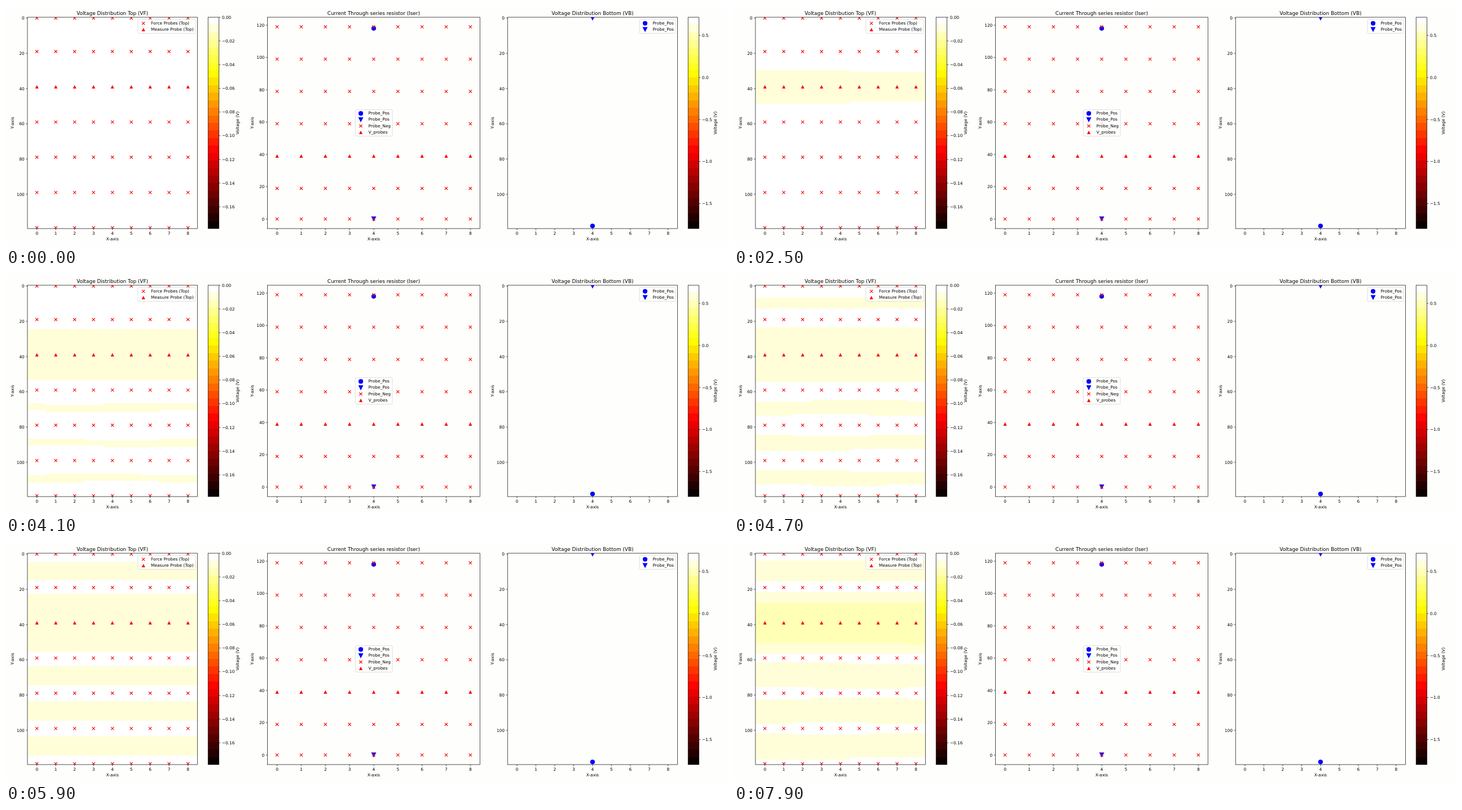
An HTML page with a canvas that plays this animation: 1280 by 427 pixels, repeating every 8000 ms.

```html
<!DOCTYPE html>
<html lang="en">
<head>
<meta charset="utf-8">
<title>Probe voltage distribution</title>
<style>
html, body { margin: 0; width: 100%; height: 100%; overflow: hidden; background: #fefefd; }
canvas { display: block; }
</style>
</head>
<body>
<canvas id="stage" width="1280" height="427"></canvas>
<script>
const ctx = document.getElementById('stage').getContext('2d');
const LOOP = 8000, FIRST_HOLD = 500, STEP = 200;
const TOP = 20, BOTTOM = 396, ROW = (BOTTOM - TOP) / 120;
const RED = '#ff0000', BLUE = '#0000ff';
const GROUND_ROWS = [0, 19, 59, 79, 99, 119];

const imageRow = v => TOP + (v + 0.5) * ROW;
const plotRow = v => 379 - v * 2.874;
const topPlot = { x: 38, w: 301.3, y: imageRow };
const currentPlot = { x: 463.5, w: 376.7, y: plotRow, xs: i => 480.6 + i * 42.83 };
const bottomPlot = { x: 889.2, w: 301.3, y: imageRow };
for (const axes of [topPlot, bottomPlot]) axes.xs = i => axes.x + (i + 0.5) * axes.w / 9;

function text(str, x, y, align = 'left', size = 7.41) {
  ctx.font = `${size}px "DejaVu Sans", sans-serif`;
  ctx.textAlign = align;
  ctx.fillStyle = '#000';
  ctx.fillText(str, x, y);
}

function verticalText(str, x, y) {
  ctx.save();
  ctx.translate(x, y);
  ctx.rotate(-Math.PI / 2);
  text(str, 0, 0, 'center');
  ctx.restore();
}

function line(x1, y1, x2, y2) {
  ctx.beginPath();
  ctx.moveTo(x1, y1);
  ctx.lineTo(x2, y2);
  ctx.stroke();
}

function marker(kind, x, y) {
  ctx.beginPath();
  if (kind === 'cross') {
    ctx.moveTo(x - 2.6, y - 2.6); ctx.lineTo(x + 2.6, y + 2.6);
    ctx.moveTo(x + 2.6, y - 2.6); ctx.lineTo(x - 2.6, y + 2.6);
    ctx.strokeStyle = RED;
    ctx.lineWidth = 1.15;
    ctx.stroke();
    return;
  }
  if (kind === 'dot') {
    ctx.arc(x, y, 4.1, 0, 7);
  } else {
    const r = kind === 'up' ? 3.1 : -4.5;
    ctx.moveTo(x, y - r);
    ctx.lineTo(x - r, y + r);
    ctx.lineTo(x + r, y + r);
  }
  ctx.fillStyle = kind === 'up' ? RED : BLUE;
  ctx.fill();
}

function border(x, y, w, h) {
  ctx.strokeStyle = '#000';
  ctx.lineWidth = 0.7;
  ctx.strokeRect(x, y, w, h);
}

function clipped(axes, paint) {
  ctx.save();
  ctx.beginPath();
  ctx.rect(axes.x, TOP, axes.w, BOTTOM - TOP);
  ctx.clip();
  paint();
  ctx.restore();
}

function probes(axes) {
  for (let i = 0; i < 9; i++) {
    for (const v of GROUND_ROWS) marker('cross', axes.xs(i), axes.y(v));
    marker('up', axes.xs(i), axes.y(39));
  }
}

function sourceProbes(axes) {
  marker('dot', axes.xs(4), axes.y(118));
  marker('down', axes.xs(4), axes.y(0));
}

function decorate(axes, title, last) {
  border(axes.x, TOP, axes.w, BOTTOM - TOP);
  const mid = axes.x + axes.w / 2;
  for (let i = 0; i < 9; i++) {
    line(axes.xs(i), BOTTOM, axes.xs(i), BOTTOM + 2.6);
    text(i, axes.xs(i), 407, 'center');
  }
  for (let v = 0; v <= last; v += 20) {
    line(axes.x - 2.6, axes.y(v), axes.x, axes.y(v));
    text(v, axes.x - 5.2, axes.y(v) + 2.7, 'right');
  }
  text('X-axis', mid, 417.3, 'center');
  verticalText('Y-axis', axes.x - 24.5, 208);
  text(title, mid, 15.7, 'center', 8.89);
}

function legend(x, y, w, entries) {
  const h = entries.length * 11.2 + 2.2;
  ctx.beginPath();
  ctx.roundRect(x, y, w, h, 1.5);
  ctx.fillStyle = 'rgba(255,255,255,.8)';
  ctx.fill();
  ctx.strokeStyle = '#d4d4d4';
  ctx.lineWidth = 0.75;
  ctx.stroke();
  entries.forEach(([kind, label], i) => {
    const cy = y + 6.6 + i * 11.2;
    marker(kind, x + 9.8, cy + 0.2);
    text(label, x + 23.3, cy + 2.2);
  });
}

function hot(t) {
  const ramp = (from, to) => Math.round(255 * Math.min(1, Math.max(0, (t - from) / (to - from))));
  return `rgb(${ramp(-0.016, 0.365)},${ramp(0.365, 0.746)},${ramp(0.746, 1)})`;
}

function colorbar(x, labels, firstY, gap, titleX) {
  const bands = 28, h = (BOTTOM - TOP) / bands;
  for (let i = 0; i < bands; i++) {
    const y0 = Math.round(TOP + i * h), y1 = Math.round(TOP + (i + 1) * h);
    ctx.fillStyle = hot(1 - i / (bands - 1));
    ctx.fillRect(x, y0, 19.3, y1 - y0);
  }
  border(x, TOP, 19.3, BOTTOM - TOP);
  labels.forEach((label, i) => {
    const y = firstY + i * gap;
    line(x + 19.3, y, x + 21.9, y);
    text(label, x + 24.5, y + 2.7);
  });
  verticalText('Voltage (V)', titleX, 208);
}

// Sheet voltage between two grounded rows, rising with each step
function voltage(row, col, n) {
  const k = GROUND_ROWS.findIndex(g => g > row);
  if (n === 0 || k < 1) return 0;
  const lo = GROUND_ROWS[k - 1], hi = GROUND_ROWS[k];
  const half = (hi - lo) / 2, d = row - (lo + hi) / 2;
  const gain = half > 15 ? 0.936 : 1;
  const ripple = 0.006 * n * Math.sin(col * 0.7 + row * 2.1 + n * 1.7);
  return gain * (n + 5.3) * (1 - Math.cosh(d / 8) / Math.cosh(half / 8)) + ripple;
}

function voltageMap(n) {
  ctx.fillStyle = '#fff';
  ctx.fillRect(topPlot.x, TOP, topPlot.w, BOTTOM - TOP);
  const w = topPlot.w / 9;
  for (let row = 0; row < 120; row++) {
    const y0 = Math.round(TOP + row * ROW), y1 = Math.round(TOP + (row + 1) * ROW);
    for (let col = 0; col < 9; col++) {
      const v = voltage(row, col, n);
      if (v < 11) continue;
      ctx.fillStyle = v > 25.2 && n > 28 ? '#ffffb6' : '#fffed8';
      const x0 = Math.round(topPlot.x + col * w);
      ctx.fillRect(x0, y0, Math.round(topPlot.x + (col + 1) * w) - x0, y1 - y0);
    }
  }
}

function draw(n) {
  ctx.fillStyle = '#fefefd';
  ctx.fillRect(0, 0, 1280, 427);

  clipped(topPlot, () => { voltageMap(n); probes(topPlot); });
  decorate(topPlot, 'Voltage Distribution Top (VF)', 100);
  legend(233.8, 24, 102.2, [['cross', 'Force Probes (Top)'], ['up', 'Measure Probe (Top)']]);
  const volts = Array.from({ length: 9 }, (_, i) => (i ? '−' : '') + (i * 0.02).toFixed(2));
  colorbar(358.2, volts, TOP, 42.15, 413);

  clipped(currentPlot, () => { sourceProbes(currentPlot); probes(currentPlot); });
  decorate(currentPlot, 'Current Through series resistor (Iser)', 120);
  legend(619.2, 184.4, 65.6, [['dot', 'Probe_Pos'], ['down', 'Probe_Pos'],
    ['cross', 'Probe_Neg'], ['up', 'V_probes']]);

  clipped(bottomPlot, () => sourceProbes(bottomPlot));
  decorate(bottomPlot, 'Voltage Distribution Bottom (VB)', 100);
  legend(1123.2, 24, 63.8, [['dot', 'Probe_Pos'], ['down', 'Probe_Pos']]);
  colorbar(1209.2, ['0.5', '0.0', '−0.5', '−1.0', '−1.5'], 52.2, 74.85, 1259.5);
}

let shown = -1;
function tick() {
  const t = performance.now() % LOOP;
  const n = t < FIRST_HOLD ? 0 : 1 + Math.floor((t - FIRST_HOLD) / STEP);
  if (n !== shown) draw(shown = n);
  requestAnimationFrame(tick);
}
tick();
</script>
</body>
</html>
```
